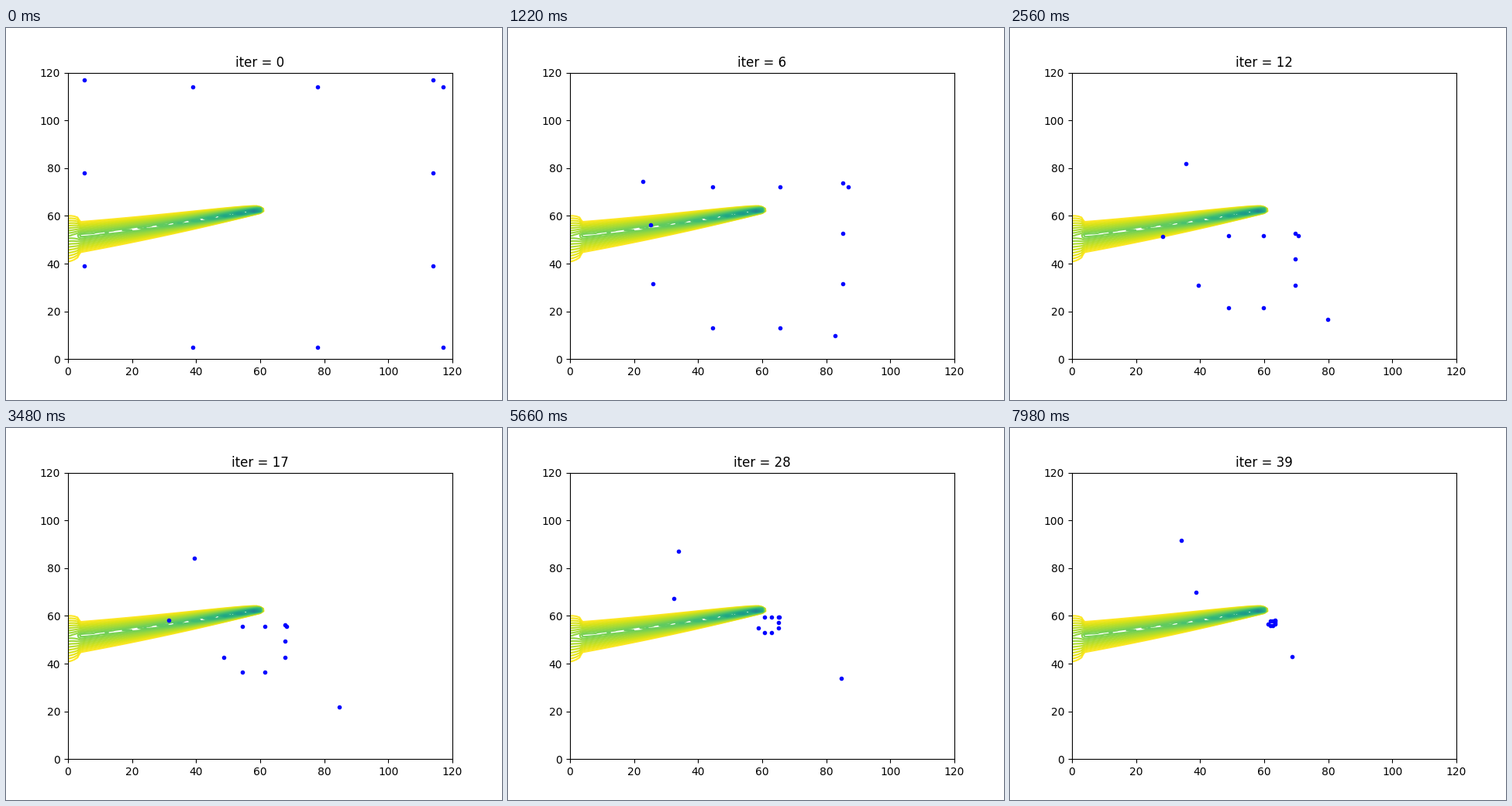
A matplotlib script that plays this animation: 640x480 px, repeating every 8 s.

```python
import numpy as np
import matplotlib.pyplot as plt
from matplotlib.animation import FuncAnimation

SIZE = 120
FRAMES = 400
STEPS = 10          # frames per iteration
LOW = 0.02          # lowest contour level and level spacing
GOAL = np.array([62.4, 57.0])

# Three agents lose the swarm and wander through a few waypoints
TURNS = [0, 61, 128, 230, 283, 399]
STRAYS = {
    (5, 117): [(22.7, 74.4), (35.6, 82), (44, 86.8), (33.9, 87.1), (34.1, 91.6)],
    (5, 78): [(25.2, 56.2), (28.3, 51.4), (35.3, 66.3), (32.4, 67.2), (38.7, 69.9)],
    (117, 5): [(82.7, 9.8), (79.8, 16.6), (90.5, 28.3), (84.7, 33.8), (68.7, 42.9)],
}


def swarm_path(start, n):
    """The ring shrinks onto the goal while its centre swings low and back."""
    middle = np.array([SIZE / 2, SIZE / 2])
    u = n[:, None] / 100
    shrink = np.exp(-u)
    dip = (u * np.exp(1 - u)) ** 4
    centre = GOAL + (middle - GOAL) * shrink - dip * [8, 24]
    return centre + (start - middle) * shrink


def stray_path(start, n):
    x, y = zip(start, *STRAYS[start])
    return np.column_stack([np.interp(n, TURNS, x), np.interp(n, TURNS, y)])


def plume():
    """Concentration on a unit grid: a ridge from the head at x = 60 to the left wall."""
    x = np.arange(SIZE + 1.0)
    y = x[:, None]
    along = np.clip(x, 0, 60)
    back = 1 - along / 60
    wall = np.sqrt(np.clip(1 - (x / 4) ** 2, 0, 1))
    centre = 51.2 + 0.14 * along + 0.0008 * along ** 2
    peak = 0.24 + 0.36 * (along / 60) ** 3 - 0.05 * wall
    up = 1.3 + 4.6 * np.sqrt(back) + 2.9 * wall
    down = 1.4 + 6 * back + 3 * wall
    off = y - centre
    reach = np.where(off > 0, up, down)
    field = LOW + (peak - LOW) * (1 - np.abs(off) / reach)
    return x, field - 0.36 * (x - along)


n = np.arange(FRAMES)
starts = [p for m in (39, 78, 117) for p in ((m, 5), (m, 114), (5, m), (114, m))]
paths = np.array([(stray_path if p in STRAYS else swarm_path)(p, n) for p in starts])

fig, ax = plt.subplots(figsize=(6.4, 4.8), dpi=100)
ax.set(xlim=(0, SIZE), ylim=(0, SIZE))
grid, field = plume()
lines = ax.contour(grid, grid, field, levels=np.arange(LOW, 1, LOW),
                   cmap="viridis_r", vmin=LOW, vmax=1)

# Keep the still part as one picture so that each frame draws quickly
fig.canvas.draw()
still = np.array(fig.canvas.buffer_rgba())
lines.remove()
ax.axis("off")
fig.figimage(still, zorder=-1)

dots, = ax.plot([], [], "b.")
title = ax.set_title("iter = 0", pad=5.4)


def update(i):
    dots.set_data(paths[:, i, 0], paths[:, i, 1])
    title.set_text(f"iter = {i // STEPS}")
    return dots, title


anim = FuncAnimation(fig, update, frames=FRAMES, interval=20,
                     repeat=True, repeat_delay=0)
plt.show()
```
